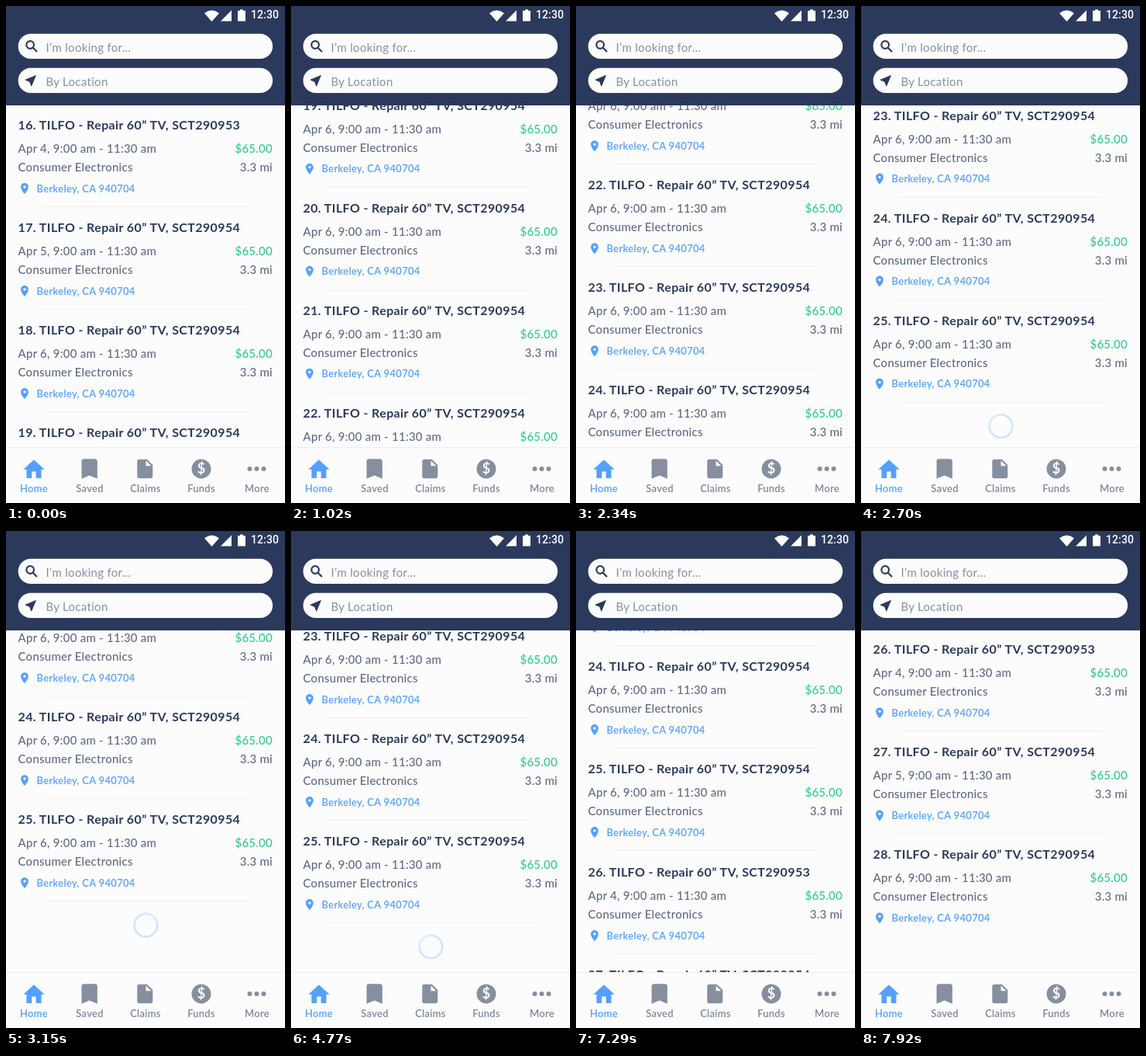
An HTML page that plays this animation: 360 by 640 pixels, repeating every 9840 ms.

```html
<!DOCTYPE html>
<html lang="en">
<head>
<meta charset="utf-8">
<title>Job list</title>
<style>
  html, body { margin: 0; width: 100%; height: 100%; overflow: hidden; background: #fcfcfc; }
  svg { display: block; width: 360px; height: 640px; }
  text { font: 500 15px Lato, sans-serif; letter-spacing: .25px; fill: #5f6b82; }
  .title { font-size: 16px; font-weight: 700; letter-spacing: .38px; fill: #2b3a5c; }
  .price { fill: #2ecc8e; }
  .place { font-size: 13px; font-weight: 600; letter-spacing: .3px; fill: #54a0ff; }
  .hint { font-weight: 400; letter-spacing: .3px; fill: #8490a3; }
  .tab { font-size: 13px; font-weight: 600; fill: #7e889a; }
  .on { fill: #54a0ff; }
  .coin { font-size: 18px; font-weight: 700; letter-spacing: 0; fill: #fcfcfc; }
  .clock { font: 500 14px Roboto, sans-serif; letter-spacing: .1px; fill: #fff; }
  .end { text-anchor: end; }
  .mid { text-anchor: middle; }
</style>
</head>
<body>
<svg id="stage" viewBox="0 0 360 640"></svg>
<script>
const LOOP = 9840, PITCH = 132;
const NAVY = '#2b3a5c', BLUE = '#54a0ff', GRAY = '#868f9f';

// Icons on a 24-unit grid
const PATHS = {
  arrow: 'M21 3L3 10.5v1l6.8 2.7L12.5 21h1z',
  pin: 'M12 2C8.1 2 5 5.1 5 9c0 5.3 7 13 7 13s7-7.7 7-13c0-3.9-3.1-7-7-7zm0 9.5a2.5 2.5 0 0 1 0-5 2.5 2.5 0 0 1 0 5z',
  home: 'M10 20v-6h4v6h5v-8h3L12 3 2 12h3v8z',
  mark: 'M17 3H7c-1.1 0-2 .9-2 2v16l7-3 7 3V5c0-1.1-.9-2-2-2z',
  file: 'M6 2c-1.1 0-2 .9-2 2v16c0 1.1.9 2 2 2h12c1.1 0 2-.9 2-2V8l-6-6zm7 7V3.5L18.5 9z'
};

const icon = (name, x, y, kx, ky, fill) =>
  `<path d="${PATHS[name]}" fill="${fill}" transform="translate(${x} ${y}) scale(${kx} ${ky}) translate(-12 -12)"/>`;
const label = (str, x, y, cls) => `<text x="${x}" y="${y}" class="${cls}">${str}</text>`;

function job(n) {
  const k = (n - 16) % 10;
  const y = 153 + (n - 16) * PITCH + (n > 25);
  const rule = n < 28 ? `<path d="M48 ${y + 105.5}H312" stroke="#efeff1"/>` : '';
  return label(`${n}. TILFO - Repair 60” TV, SCT29095${k ? 4 : 3}`, 15.5, y + 6, 'title') +
    label(`Apr ${Math.min(4 + k, 6)}, 9:00 am - 11:30 am`, 15.5, y + 36, '') +
    label('$65.00', 344, y + 36, 'price end') +
    label('Consumer Electronics', 15.5, y + 60, '') +
    label('3.3 mi', 344, y + 60, 'end') +
    icon('pin', 24, y + 82, .7, .7, BLUE) +
    label('Berkeley, CA 940704', 39.5, y + 86.5, 'place') + rule;
}

const jobs = (from, to) => {
  let out = '';
  for (let n = from; n <= to; n++) out += job(n);
  return out;
};

const field = (y, glyph, hint) =>
  `<rect x="15.7" y="${y - .3}" width="328.4" height="32.4" rx="16.2" fill="#fcfcfc"/>` +
  glyph + label(hint, 51.5, y + 23, 'hint');
const lens = `<path d="M35 54L40 59M36 50a4.8 4.8 0 1 0-9.6 0a4.8 4.8 0 1 0 9.6 0" fill="none" stroke="${NAVY}" stroke-width="2.2"/>`;

const tabs = ['Home', 'Saved', 'Claims', 'Funds', 'More']
  .map((name, i) => label(name, 36 + 72 * i, 626, i ? 'tab mid' : 'tab mid on')).join('');
const dots = [314.5, 323.5, 332.5].map(x => `<circle cx="${x}" cy="596" r="3" fill="${GRAY}"/>`).join('');

document.getElementById('stage').innerHTML = `
  <rect width="360" height="640" fill="#fcfcfc"/>
  <g id="list">
    ${jobs(16, 25)}
    <g id="more">${jobs(26, 28)}</g>
    <g id="loader" fill="none" stroke-width="2.5">
      <circle cx="180.5" cy="1477.5" r="14.8" stroke="#cde4ff"/>
      <path id="arc" d="M195.3 1477.5A14.8 14.8 0 0 1 180.5 1492.3" stroke="#dcecff"/>
    </g>
  </g>
  <rect width="360" height="128" fill="${NAVY}"/>
  <path d="M256 9.2Q265.5 1.8 275 9.2L265.5 20zM291 5.5V19.5H277z" fill="#fff"/>
  <path d="M302 4.5h4V6h3V19.5h-10V6h3z" fill="#fff"/>
  ${label('12:30', 316, 16, 'clock')}
  ${field(36, lens, 'I’m looking for...')}
  ${field(80, icon('arrow', 32, 96, .8, .8, NAVY), 'By Location')}
  <rect y="568" width="360" height="72" fill="#fcfcfc"/>
  <path d="M0 568.5H360" stroke="#ececee"/>
  ${icon('home', 36, 596.8, 1.36, 1.4, BLUE)}
  ${icon('mark', 107.7, 596, 1.45, 1.42, GRAY)}
  ${icon('file', 179.3, 596, 1.25, 1.23, GRAY)}
  <circle cx="252" cy="596" r="12.5" fill="${GRAY}"/>
  ${label('$', 252, 602.2, 'coin mid')}
  ${dots}${tabs}`;

const [list, more, loader, arc] = ['list', 'more', 'loader', 'arc'].map(id => document.getElementById(id));
const clamp = v => Math.max(0, Math.min(1, v));

// cubic-bezier(.4, 0, .2, 1)
function ease(x) {
  let lo = 0, hi = 1;
  for (let i = 0; i < 24; i++) {
    const s = (lo + hi) / 2, r = 1 - s;
    if (1.2 * r * r * s + .6 * r * s * s + s ** 3 < x) lo = s; else hi = s;
  }
  return lo * lo * (3 - 2 * lo);
}

// start ms, duration ms, distance px
const SCROLLS = [[400, 1070, 490], [1990, 1040, 480], [3115, 700, -28], [7063, 900, 380]];

function draw(t) {
  const y = SCROLLS.reduce((sum, [start, time, dist]) => sum + dist * ease(clamp((t - start) / time)), 0);
  const loaded = clamp((t - 6060) / 180);
  list.setAttribute('transform', `translate(0 ${-y})`);
  more.setAttribute('opacity', loaded);
  loader.setAttribute('opacity', 1 - loaded);
  arc.setAttribute('transform', `rotate(${50 + (t - 3990) * .18} 180.5 1477.5)`);
}

const begin = performance.now();
function tick() {
  draw((performance.now() - begin) % LOOP);
  requestAnimationFrame(tick);
}
tick();
</script>
</body>
</html>
```
